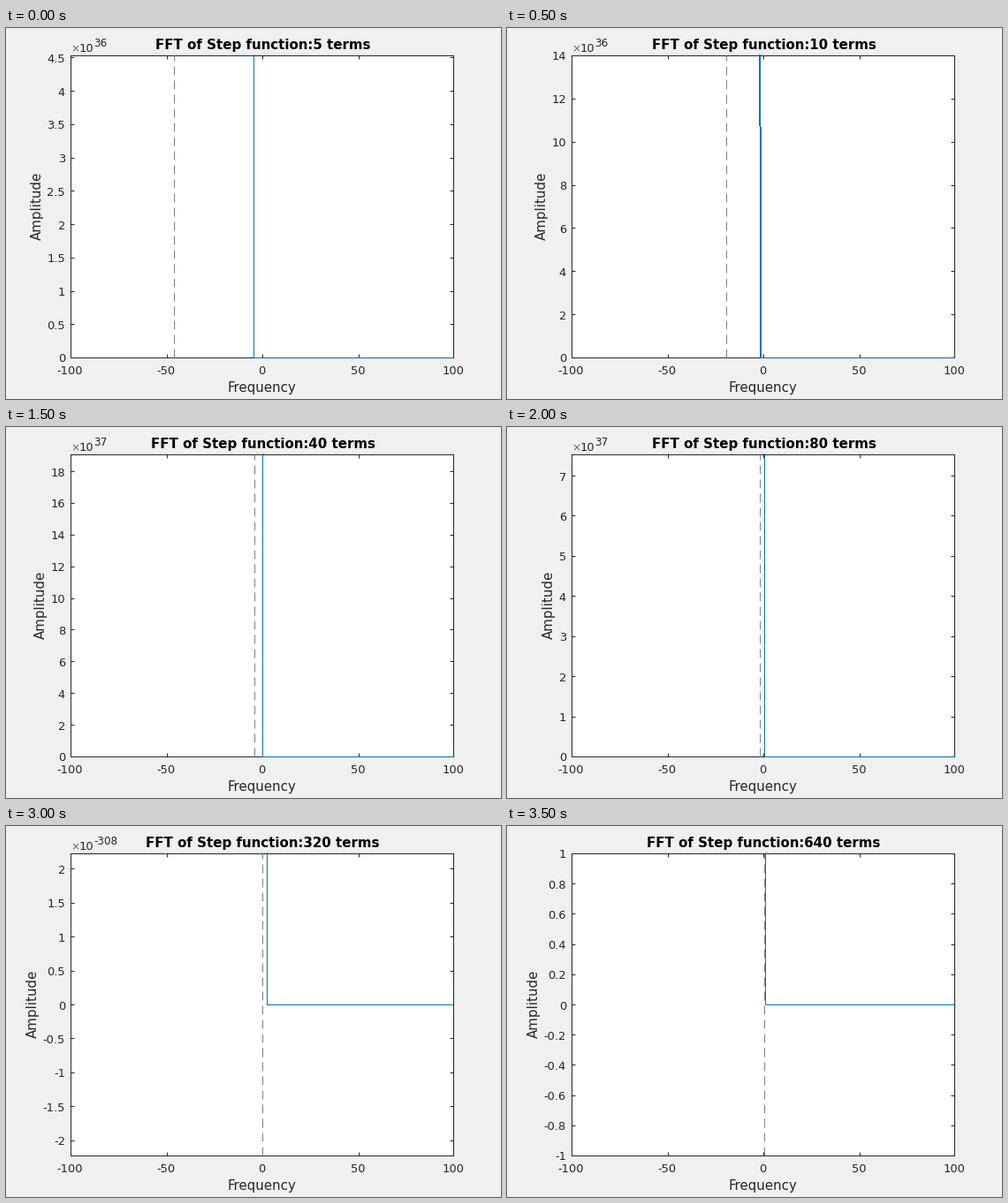
A matplotlib script for the animation above (4 s loop, 560x420 px).

```python
import numpy as np
import matplotlib.pyplot as plt
from matplotlib.animation import FuncAnimation
from matplotlib.patches import Rectangle

W, H, DPI = 560, 420, 100
PT = 72 / DPI
# whole-pixel coordinates: snapped lines fill exactly that row or column
LEFT, RIGHT, TOP, BOTTOM = 73, 506, 31, 373
INK, BLUE, DASH = "#262626", "#0072BD", "#808080"

plt.rcParams["font.family"] = "DejaVu Sans"
fig = plt.figure(figsize=(W / DPI, H / DPI), dpi=DPI, facecolor="#f0f0f0")
ax = fig.add_axes([0, 0, 1, 1])

# lower limit, upper limit, tick step, exponent, label column,
# dashed column, curve column at its top and at its foot
SCENES = [
    (0, 4.533, 0.5, "36", 27, 190, 280.5, 280.5),
    (0, 14, 2, "36", 31, 248, 286.3, 287.15),
    (0, 7, 1, "37", 39, 271, 289.5, 289.5),
    (0, 19.06, 2, "37", 31, 281, 290.5, 290.5),
    (0, 7.53, 1, "37", 39, 286, 291.5, 291.5),
    (0, 2.803, 0.5, "-96", 27, 289, 299.5, 299.5),
    (-2.225, 2.225, 0.5, "-308", 22, 290, 295.5, 295.5),
    (-1, 1, 0.2, "", 22, 291, 292.5, 292.5),
]


def line(xs, ys, color=INK, **kw):
    ax.plot(xs, ys, color=color, lw=PT, solid_capstyle="butt",
            dash_capstyle="butt", **kw)


def text(x, y, s, px, ha="center", color=INK, **kw):
    ax.text(x, y, s, fontsize=px * PT, ha=ha, va="baseline", color=color, **kw)


def draw_axes(lo, hi, step, to_y):
    line([LEFT, RIGHT, RIGHT, LEFT, LEFT], [TOP, TOP, BOTTOM, BOTTOM, TOP])
    for v in range(-100, 101, 50):
        x = 290 + v * 2.17
        text(x - 0.6, 392, str(v), 13)
        if abs(v) < 100:
            line([x, x], [BOTTOM, BOTTOM - 4])
            line([x, x], [TOP, TOP + 4])
    first, last = np.ceil(lo / step - 1e-6), np.floor(hi / step + 1e-6)
    for k in range(int(first), int(last) + 1):
        y = to_y(k * step)
        line([LEFT, LEFT + 4], [y, y])
        line([RIGHT, RIGHT - 4], [y, y])
        text(67, y + 5.5, f"{k * step:.4g}", 13, ha="right")


def draw(i):
    lo, hi, step, power, label_x, dash_x, curve_top, curve_foot = SCENES[i]

    def to_y(v):
        return BOTTOM - (v - lo) / (hi - lo) * (BOTTOM - TOP)

    ax.clear()
    ax.set(xlim=(0, W), ylim=(H, 0))
    ax.axis("off")
    ax.add_patch(Rectangle((LEFT, TOP), RIGHT - LEFT, BOTTOM - TOP,
                           fc="white", ec="none"))
    draw_axes(lo, hi, step, to_y)
    line([dash_x, dash_x], [BOTTOM, TOP], DASH, ls=(0, (10, 6)))
    zero = to_y(0) + 0.5
    line([curve_top, curve_foot, RIGHT], [TOP - 1, zero, zero], BLUE,
         snap=False, antialiased=False)

    text(290.5, 24, f"FFT of Step function:{5 * 2 ** i} terms", 15,
         color="black", weight="bold")
    text(289.2, 412, "Frequency", 15)
    text(label_x + 13, 201, "Amplitude", 15, rotation=90,
         rotation_mode="anchor")
    if power:
        text(73, 27, "×", 12, ha="left", color="#666666")
        text(82.6, 27, "10", 13, ha="left")
        text(99.6, 21, power, 12, ha="left")
    return []


anim = FuncAnimation(fig, draw, frames=len(SCENES), interval=500,
                     repeat=True, repeat_delay=0, cache_frame_data=False)
plt.show()
```
